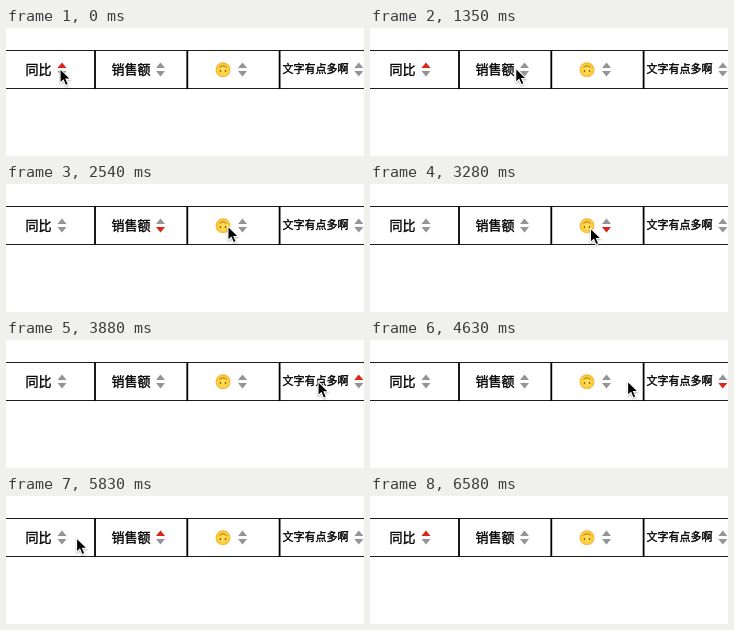
Recreate the animation shown at these times as an HTML page with a canvas. Size 358x128 px, loop 7.19 s.

```html
<!DOCTYPE html>
<html lang="zh-CN">
<head>
<meta charset="utf-8">
<title>表头排序</title>
<style>
  html, body { margin: 0; width: 100%; height: 100%; overflow: hidden; background: #fff; }
  canvas { display: block; width: 358px; height: 128px; }
</style>
</head>
<body>
<canvas id="stage"></canvas>
<script>
const W = 358, H = 128, LOOP = 7190, TICK = 149.7;
const GRAY = '#929497', RED = '#dc2417';
const canvas = document.getElementById('stage');
const ctx = canvas.getContext('2d');
const ratio = window.devicePixelRatio || 1;
canvas.width = W * ratio;
canvas.height = H * ratio;

// Clicks and glides are timed in ticks, the rate at which the screen refreshes.
const columns = [
  { label: '同比', x: 19.6, size: 13, arrow: 56, clicks: [0, 2, 4, 7, 42] },
  { label: '销售额', x: 105.5, size: 13, arrow: 154.5, clicks: [11, 13, 38] },
  { label: '', arrow: 236.5, clicks: [19, 22, 35] },
  { label: '文字有点多啊', x: 276.4, size: 11, arrow: 352.8, clicks: [26, 29] }
];
const clicks = columns
  .flatMap((column, col) => column.clicks.map(at => ({ at, col })))
  .sort((a, b) => a.at - b.at);

const home = { x: 53.6, y: 39.7 };
const glides = [
  { from: 4, to: 5, x: 66, y: 42.5 },
  { from: 7, to: 9, x: 145.3, y: 39 },
  { from: 13, to: 17, x: 221.5, y: 41 },
  { from: 19, to: 20, x: 220, y: 43 },
  { from: 22, to: 26, x: 311.6, y: 40.3 },
  { from: 29, to: 33, x: 222, y: 40 },
  { from: 34, to: 36, x: 109, y: 39 },
  { from: 38, to: 40, x: 45, y: 42 },
  { from: 42, to: 44, x: 390, y: 158 }
];

const easeOut = u => 1 - (1 - u) ** 1.35;

function pointerAt(tick) {
  let { x, y } = home;
  for (const glide of glides) {
    const u = Math.min(1, Math.max(0, (tick - glide.from) / (glide.to - glide.from)));
    x += (glide.x - x) * easeOut(u);
    y += (glide.y - y) * easeOut(u);
  }
  return { x, y };
}

// Repeated clicks on a column cycle through up (1), down (2) and none (0).
function sortAt(tick) {
  let col = 0, dir = 0;
  for (const click of clicks) {
    if (click.at > tick) break;
    dir = click.col === col ? (dir + 1) % 3 : 1;
    col = click.col;
  }
  return { col, dir };
}

function polygon(points, color) {
  ctx.beginPath();
  points.forEach(([x, y]) => ctx.lineTo(x, y));
  ctx.closePath();
  ctx.fillStyle = color;
  ctx.fill();
}

function drawGrid() {
  ctx.fillStyle = '#1c1c1c';
  for (const y of [22, 60]) ctx.fillRect(0, y, W, 1);
  ctx.fillStyle = '#000';
  for (let i = 0; i < 3; i++) ctx.fillRect(88.1 + 92.3 * i, 22, 1.8, 39);
}

function drawLabel({ label, x, size }) {
  ctx.font = `500 ${size}px "Noto Sans CJK SC", "Noto Sans CJK", sans-serif`;
  ctx.fillStyle = ctx.strokeStyle = '#000';
  ctx.lineWidth = 0.35;
  const baseline = 41.4 + size * 0.37;
  ctx.fillText(label, x, baseline);
  ctx.strokeText(label, x, baseline);
}

function drawArrows(x, dir) {
  polygon([[x, 34.5], [x + 4.5, 40], [x - 4.5, 40]], dir === 1 ? RED : GRAY);
  polygon([[x, 48.5], [x + 4.5, 43], [x - 4.5, 43]], dir === 2 ? RED : GRAY);
}

function drawFace(x, y) {
  ctx.save();
  ctx.translate(x, y);
  ctx.rotate(Math.PI);
  const glow = ctx.createRadialGradient(0, -1, 1, 0, 0, 7.6);
  glow.addColorStop(0, '#ffe256');
  glow.addColorStop(0.7, '#fdcd3c');
  glow.addColorStop(1, '#f3ac2e');
  ctx.fillStyle = glow;
  ctx.beginPath();
  ctx.arc(0, 0, 7.4, 0, Math.PI * 2);
  ctx.fill();
  ctx.fillStyle = ctx.strokeStyle = '#8a5715';
  for (const side of [-1, 1]) {
    ctx.beginPath();
    ctx.ellipse(side * 2.5, -1.4, 0.8, 1.15, 0, 0, Math.PI * 2);
    ctx.fill();
  }
  ctx.lineWidth = 0.8;
  ctx.lineCap = 'round';
  ctx.beginPath();
  ctx.arc(0, -0.4, 4.3, Math.PI * 0.22, Math.PI * 0.78);
  ctx.stroke();
  ctx.restore();
}

function drawPointer({ x, y }) {
  ctx.save();
  ctx.translate(x, y);
  ctx.shadowColor = 'rgba(0,0,0,.3)';
  ctx.shadowBlur = 2 * ratio;
  ctx.shadowOffsetY = ratio;
  polygon([[0, 0], [0, 16.5], [3.6, 13.2], [5.8, 18.5], [9.3, 17], [7.1, 12], [12, 12]], '#fff');
  ctx.shadowColor = 'transparent';
  polygon([[1, 2.4], [1, 14.2], [3.9, 11.5], [6.3, 17.1], [8, 16.3], [5.6, 10.9], [9.7, 10.9]], '#000');
  ctx.restore();
}

function draw(time) {
  const tick = Math.floor((time + 15) / TICK);
  const sort = sortAt(tick);
  ctx.setTransform(ratio, 0, 0, ratio, 0, 0);
  ctx.fillStyle = '#fff';
  ctx.fillRect(0, 0, W, H);
  drawGrid();
  columns.forEach((column, i) => {
    if (column.label) drawLabel(column);
    drawArrows(column.arrow, i === sort.col ? sort.dir : 0);
  });
  drawFace(217, 41.7);
  drawPointer(pointerAt(tick));
}

const start = performance.now();
function frame() {
  draw((performance.now() - start) % LOOP);
  requestAnimationFrame(frame);
}
frame();
</script>
</body>
</html>
```
